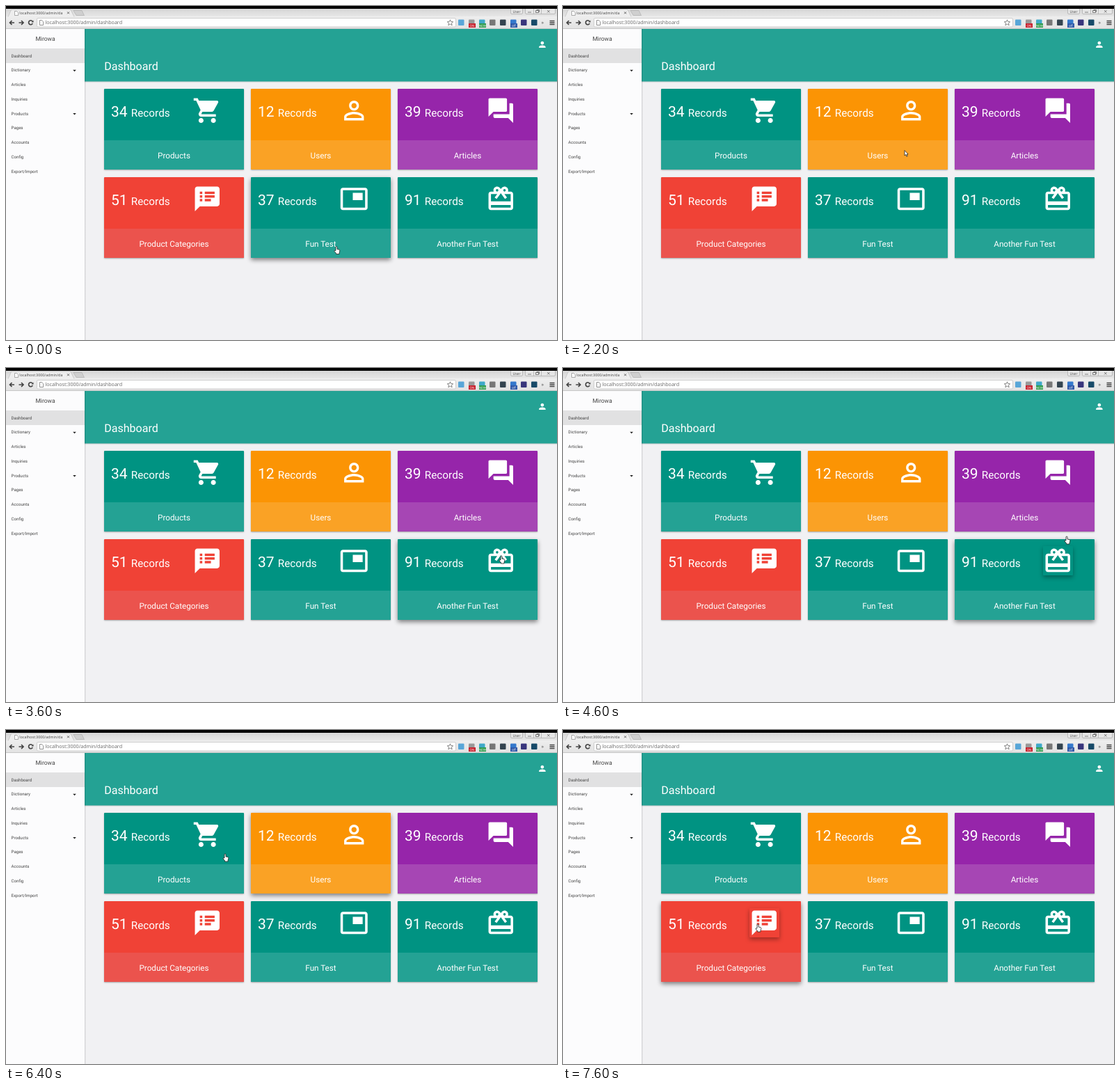
An HTML page for the animation above (8 s loop, 792 by 480 pixels).

```html
<!DOCTYPE html>
<html lang="en">
<head>
<meta charset="utf-8">
<title>Dashboard</title>
<style>
html, body { margin: 0; width: 100%; height: 100%; overflow: hidden; }
body { position: relative; background: #f1f1f3; font-family: Roboto, sans-serif; }
svg { position: absolute; left: 0; top: 0; overflow: visible; }
text { text-rendering: geometricPrecision; }
.browser { font-family: "Open Sans", sans-serif; }
.card { position: absolute; width: 201px; height: 116px; border-radius: 1px; box-shadow: 0 1px 2px rgba(0,0,0,.32); }
.card.hover { box-shadow: 0 3px 6px rgba(0,0,0,.48); }
.footer { position: absolute; top: 74px; width: 100%; height: 42px; border-radius: 0 0 1px 1px; }
.icon { position: absolute; left: 127px; top: 9.5px; width: 42.5px; height: 42.5px; border-radius: 1px; }
.icon.hover { box-shadow: 0 3px 6px rgba(0,0,0,.34); }
</style>
</head>
<body>
<svg id="page" width="792" height="480">
  <defs>
    <linearGradient id="strip" x2="0" y2="1"><stop stop-color="#d6d6d6"/><stop offset="1" stop-color="#e6e6e6"/></linearGradient>
    <linearGradient id="toolbar" x2="0" y2="1"><stop stop-color="#eee"/><stop offset="1" stop-color="#e2e2e2"/></linearGradient>
    <linearGradient id="shade" x2="0" y2="1"><stop stop-opacity=".16"/><stop offset="1" stop-opacity="0"/></linearGradient>
    <linearGradient id="edge"><stop stop-opacity=".16"/><stop offset="1" stop-opacity="0"/></linearGradient>
  </defs>

  <rect x="113" y="33" width="679" height="75.5" fill="#24a294"/>
  <rect x="113" y="108.5" width="679" height="2" fill="url(#shade)"/>
  <text x="141.3" y="92" font-size="16" fill="#fff">Dashboard</text>
  <path transform="translate(763.8 48.3) scale(.59)" fill="#fff" d="M12 12c2.2 0 4-1.8 4-4s-1.8-4-4-4-4 1.800-4 4 1.800 4 4 4zm0 2c-2.700 0-8 1.300-8 4v2h16v-2c0-2.700-5.300-4-8-4z"/>

  <rect y="33" width="113" height="447" fill="#fcfcfd"/>
  <rect x="113" y="33" width="2" height="447" fill="url(#edge)"/>
  <rect y="61" width="113" height="21" fill="#e1e1e2"/>
  <text x="56.5" y="50" font-size="8.5" fill="#444" text-anchor="middle">Mirowa</text>
  <g id="menu" font-size="6.1" fill="#444"></g>

  <g class="browser">
    <rect width="792" height="4"/>
    <rect y="4" width="792" height="11" fill="url(#strip)"/>
    <rect y="15" width="792" height="18" fill="url(#toolbar)"/>
    <path d="M0 32.5H792" stroke="#c6c6c6"/>
    <path d="M3 15.5 7 6.5Q7.500 5 9 5H91Q93 5 93.600 6.500L98 15.500" fill="#eee" stroke="#b5b5b5" stroke-width=".6"/>
    <path d="M97 6.500H109L112.500 13.500H101Z" fill="#cfcfcf" stroke="#aaa" stroke-width=".6"/>
    <path d="M12.500 7.500H15.500L17.500 9.500V13.500H12.500Z" fill="#fff" stroke="#888" stroke-width=".7"/>
    <text x="19.300" y="12.200" font-size="5.350" fill="#444">localhost:3000/admin/da</text>
    <path d="M88 8.300 91 11.300M91 8.300 88 11.300" stroke="#555" stroke-width=".9"/>
    <g fill="none" stroke="#aaa" stroke-width=".7">
      <path d="M725.500 4V10Q725.500 11.500 727 11.500H741Q742.500 11.500 742.500 10V4M746.500 4V10Q746.500 11.500 748 11.500H788Q789.500 11.500 789.500 10V4M758.500 4V11.500M769.500 4V11.500" fill="#e6e6e6"/>
      <path d="M750 9H755M761.500 6.500H765.500V9.500H761.500ZM763 6.500V5.500H766.500V8.500H765.500M778 6 781.500 9.500M781.500 6 778 9.500" stroke="#555"/>
    </g>
    <text x="734" y="9.800" font-size="5" text-anchor="middle" fill="#444">User</text>

    <rect x="44.500" y="17.500" width="602" height="12.500" rx="1.500" fill="#fff" stroke="#c4c4c4" stroke-width=".8"/>
    <path d="M48.500 20.500H51.500L53.500 22.500V27.500H48.500Z" fill="#fff" stroke="#777" stroke-width=".8"/>
    <text x="56.500" y="26.300" font-size="7.150" fill="#666">localhost:3000/admin/dashboard</text>
    <g fill="none" stroke="#444" stroke-width="1.700">
      <path d="M12 24H6M8.500 21 5.500 24 8.500 27M18.500 24H24.500M22 21 25 24 22 27M38 22A3 3 0 1 0 38.300 25"/>
      <path d="M781.500 21.500H788.500M781.500 24H788.500M781.500 26.500H788.500" stroke-width="1.300"/>
    </g>
    <path d="M36.500 23.500H39.500V20.500Z" fill="#444"/>
    <path d="M638.500 19.800 639.700 22.500 642.700 22.800 640.400 24.700 641.200 27.700 638.500 26.100 635.800 27.700 636.600 24.700 634.300 22.800 637.300 22.500Z" fill="#fff" stroke="#666" stroke-width=".8"/>
    <g id="extensions"></g>
    <text x="769.500" y="26" font-size="7" fill="#444">»</text>
  </g>
</svg>

<div id="cards"></div>

<svg id="pointer" width="1" height="1" fill="#fff" stroke="#222" stroke-width=".8" stroke-linejoin="round">
  <path id="hand" d="M-1 6V1Q-1 0 0 0T1 1V4L4 4.600Q5 5 4.800 6.500L4 9.500V11H-.5V9.700L-3 7Q-3.200 5.600-2 5.800Z"/>
  <path id="arrow" d="M0 0V7.500L1.700 6 2.900 8.800 4.200 8.200 3 5.500H5.200Z"/>
</svg>

<script>
const STEP = 200, LOOP = 8000, HOVER_LAG = 100;
const $ = id => document.getElementById(id);

const menu = ["Dashboard", "Dictionary", "Articles", "Inquiries", "Products", "Pages", "Accounts", "Config", "Export/Import"];
$("menu").innerHTML = menu.map((label, i) => {
  const y = 73.6 + i * 20.75;
  const caret = i === 1 || i === 4 ? `<path d="M96.200 ${y - 2.6}h4.600l-2.300 2.400z" fill="#222"/>` : "";
  return `<text x="7.600" y="${y}">${label}</text>${caret}`;
}).join("");

// Toolbar buttons: fill, optional badge colour and label
const extensions = [
  ["#58a6d8"], ["#999", "#c8202c", "ON"], ["#3fa9c9", "#2c9a4b", "NEW"], ["#777"],
  ["#344450"], ["#3478cc", "#3059a8", "off"], ["#38357c"], ["#174a68"]
];
$("extensions").innerHTML = extensions.map(([fill, badge, label], i) => {
  const x = 654 + i * 15;
  return `<rect x="${x - 4}" y="19.500" width="8.500" height="8.500" rx="1" fill="${fill}"/>` + (badge
    ? `<rect x="${x - 4}" y="25" width="10" height="6" fill="${badge}"/><text x="${x + 1}" y="29.700" font-size="4.500" text-anchor="middle" fill="#fff">${label}</text>`
    : "");
}).join("");

const icons = {
  cart: "M7 18c-1.1 0-2 .9-2 2s.9 2 2 2 2-.9 2-2-.9-2-2-2zM1 2v2h2l3.600 7.590-1.350 2.450c-.16.28-.25.61-.25.96 0 1.1.9 2 2 2h12v-2H7.420c-.14 0-.25-.11-.25-.25l.03-.12.9-1.630h7.450c.75 0 1.410-.41 1.750-1.030l3.580-6.490A1 1 0 0 0 20 4H5.210l-.94-2zM17 18c-1.1 0-2 .9-2 2s.9 2 2 2 2-.9 2-2-.9-2-2-2z",
  person: "M12 5.900c1.160 0 2.100.94 2.100 2.100s-.94 2.100-2.100 2.100S9.900 9.160 9.900 8s.94-2.100 2.100-2.100m0 9c2.970 0 6.100 1.460 6.100 2.100v1.100H5.900V17c0-.64 3.130-2.100 6.100-2.100M12 4C9.790 4 8 5.790 8 8s1.790 4 4 4 4-1.790 4-4-1.790-4-4-4zm0 9c-2.670 0-8 1.340-8 4v3h16v-3c0-2.660-5.330-4-8-4z",
  chat: "M21 6h-2v9H6v2c0 .55.45 1 1 1h11l4 4V7c0-.55-.45-1-1-1zm-4 6V3c0-.55-.45-1-1-1H3c-.55 0-1 .45-1 1v14l4-4h10c.55 0 1-.45 1-1z",
  notes: "M20 2H4c-1.100 0-2 .9-2 2v18l4-4h14c1.100 0 2-.9 2-2V4c0-1.100-.9-2-2-2zM8 14H6v-2h2zm0-3H6V9h2zm0-3H6V6h2zm7 6h-5v-2h5zm3-3h-8V9h8zm0-3h-8V6h8z",
  picture: "M19 7h-8v6h8zm2-4H3c-1.100 0-2 .9-2 2v14c0 1.100.9 2 2 2h18c1.100 0 2-.9 2-2V5c0-1.100-.9-2-2-2zm0 16H3V5h18z",
  gift: "M20 6h-2.180c.11-.31.18-.65.18-1 0-1.660-1.340-3-3-3-1.050 0-1.960.54-2.500 1.350l-.5.67-.5-.68C10.960 2.540 10.050 2 9 2 7.340 2 6 3.340 6 5c0 .35.07.69.18 1H4c-1.110 0-2 .89-2 2v11c0 1.110.89 2 2 2h16c1.110 0 2-.89 2-2V8c0-1.110-.89-2-2-2zm-5-2c.55 0 1 .45 1 1s-.45 1-1 1-1-.45-1-1 .45-1 1-1zM9 4c.55 0 1 .45 1 1s-.45 1-1 1-1-.45-1-1 .45-1 1-1zm11 15H4v-2h16zm0-5H4V8h5.080L7 10.830 8.620 12 11 8.760l1-1.360 1 1.360L15.380 12 17 10.830 14.920 8H20z"
};

const teal = ["#009382", "#24a294"];
const cards = [
  ["34", "Products", "cart", teal],
  ["12", "Users", "person", ["#fb9404", "#faa225"]],
  ["39", "Articles", "chat", ["#9625aa", "#a646b4"]],
  ["51", "Product Categories", "notes", ["#f04236", "#eb534d"]],
  ["37", "Fun Test", "picture", teal],
  ["91", "Another Fun Test", "gift", teal]
].map(([count, label, icon, [main, light]], i) => {
  const x = 141 + i % 3 * 211, y = i < 3 ? 119 : 246;
  const el = document.createElement("div");
  el.className = "card";
  el.style.cssText = `left:${x}px;top:${y}px;background:${main}`;
  el.innerHTML = `<div class="footer" style="background:${light}"></div>
    <div class="icon"><svg width="42.500" height="42.500" viewBox="0 0 24 24" fill="#fff"><path d="${icons[icon]}"/></svg></div>
    <svg width="201" height="116" fill="#fff">
      <text x="10" y="39.700" font-size="21">${count} <tspan font-size="15.300">Records</tspan></text>
      <text x="100.500" y="99.600" font-size="11.700" text-anchor="middle">${label}</text>
    </svg>`;
  $("cards").append(el);
  return { el, icon: el.querySelector(".icon"), x, y };
});

// Pointer path: time, x, y
const path = [
  [0, 475, 345.5], [400, 475, 345.5], [600, 469, 374], [800, 457, 396], [1400, 457, 396],
  [1600, 459, 372], [2000, 482, 265], [2400, 500, 150], [2600, 502, 240], [2800, 499, 276],
  [3200, 598, 280], [3600, 712, 270], [3800, 737, 283], [4200, 722, 275], [4400, 722, 275],
  [4600, 724, 242], [5000, 715, 150], [5200, 708, 160], [5600, 673, 207], [5800, 600, 205],
  [6000, 500, 170], [6200, 420, 165], [6400, 315, 178], [6600, 290, 150], [6800, 285, 160],
  [7200, 262, 260], [7600, 280, 279], [8000, 280, 279]
];

function pointerAt(time) {
  const next = path.findIndex(p => p[0] > time);
  const [t0, x0, y0] = path[next - 1], [t1, x1, y1] = path[next];
  const k = (time - t0) / (t1 - t0);
  return [x0 + (x1 - x0) * k, y0 + (y1 - y0) * k];
}

const inside = ([px, py], x, y, w, h) => px >= x && px < x + w && py >= y && py < y + h;

function render(now) {
  const time = Math.floor(now % LOOP / STEP) * STEP;
  const [x, y] = pointerAt(time);
  const lagged = pointerAt(Math.max(0, time - HOVER_LAG));
  let overCard = false;
  for (const card of cards) {
    const hover = inside(lagged, card.x, card.y, 201, 116);
    card.el.classList.toggle("hover", hover);
    card.icon.classList.toggle("hover", inside(lagged, card.x + 127, card.y + 9.5, 42.5, 42.5));
    overCard ||= hover;
  }
  $("pointer").style.transform = `translate(${x}px, ${y}px)`;
  $("hand").style.display = overCard ? "" : "none";
  $("arrow").style.display = overCard ? "none" : "";
}

const start = performance.now();
function tick() {
  render(performance.now() - start);
  requestAnimationFrame(tick);
}
tick();
</script>
</body>
</html>
```
